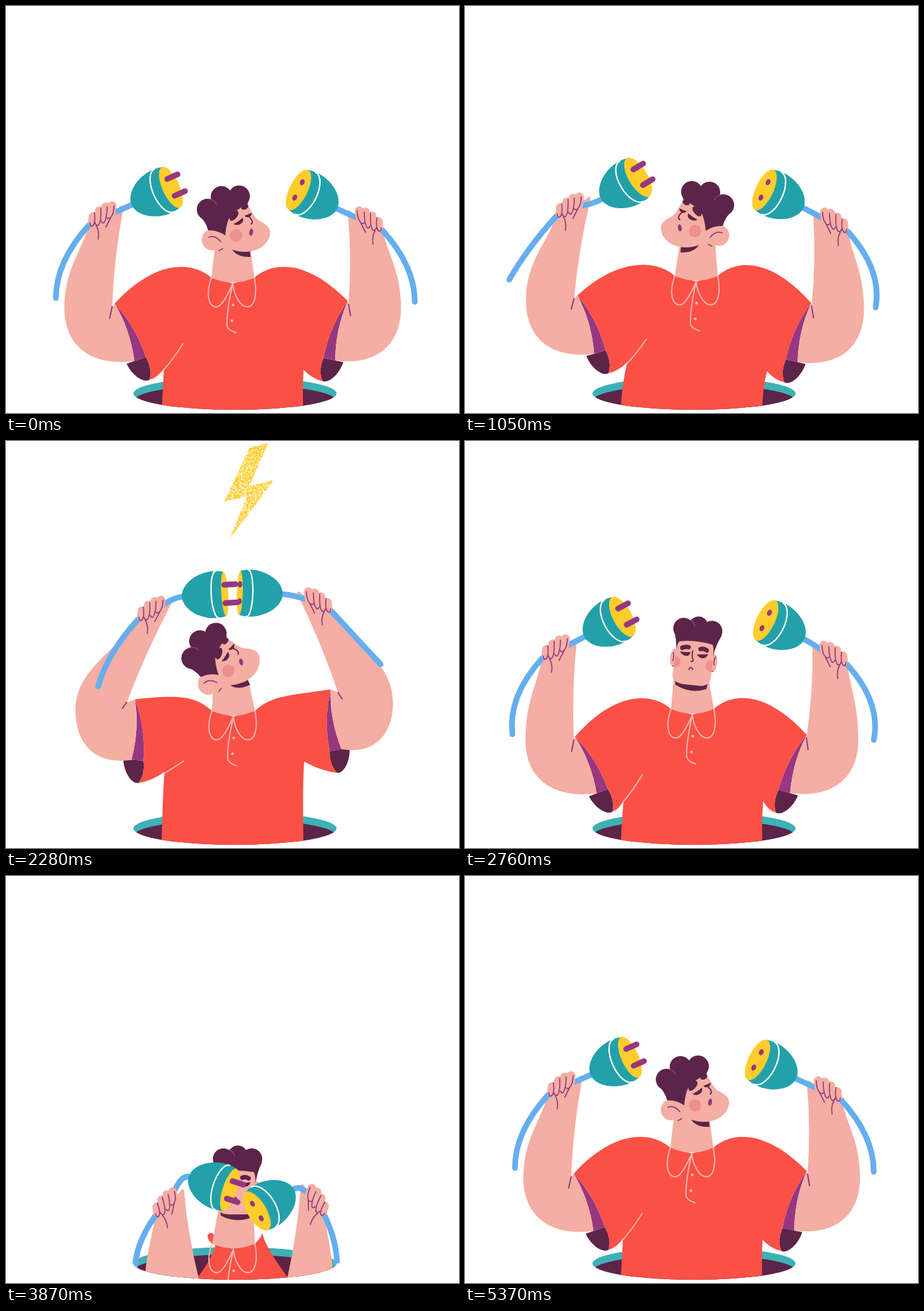
An HTML page with a canvas for the animation above (5400 ms loop, 717 by 644 pixels).

```html
<!DOCTYPE html>
<html lang="en">
<head>
<meta charset="utf-8">
<title>Plugging in</title>
<style>
html, body { margin: 0; width: 100%; height: 100%; overflow: hidden; background: #fff; }
canvas { display: block; }
</style>
</head>
<body>
<canvas id="stage" width="717" height="644"></canvas>
<script>
const W = 717, LOOP = 5400;
const ctx = document.getElementById('stage').getContext('2d');
const SHIRT = '#fb5046', SKIN = '#f4aea3', PURPLE = '#963780', DARK = '#5c2448', TEAL = '#22a1aa',
  YELLOW = '#ffcd2b', BLUE = '#65aeef', BLUSH = '#ee8f8f', SEAM = '#fbb5ac';

const fill = (color, d) => { ctx.fillStyle = color; ctx.fill(new Path2D(d)); };
const line = (color, width, d) => {
  ctx.strokeStyle = color;
  ctx.lineWidth = width;
  ctx.stroke(new Path2D(d));
};
const oval = (color, x, y, rx, ry = rx, deg = 0) => {
  ctx.fillStyle = color;
  ctx.beginPath();
  ctx.ellipse(x, y, rx, ry, rad(deg), 0, 7);
  ctx.fill();
};
const rad = deg => deg * Math.PI / 180;
const clamp = (v, lo, hi) => Math.min(hi, Math.max(lo, v));
const add = (p, x, y) => [p[0] + x, p[1] + y];
const mix = (p, q, k) => [p[0] + (q[0] - p[0]) * k, p[1] + (q[1] - p[1]) * k];
const turn = (p, deg, x, y) => {
  const c = Math.cos(rad(deg)), s = Math.sin(rad(deg));
  return add(p, x * c - y * s, x * s + y * c);
};
const at = (x, y, deg, draw) => {
  ctx.save();
  ctx.translate(x, y);
  ctx.rotate(rad(deg));
  draw();
  ctx.restore();
};
const mirrored = draw => {
  ctx.save();
  ctx.translate(W, 0);
  ctx.scale(-1, 1);
  draw();
  ctx.restore();
};

// Pose: neck x y, head x y tilt facing, then per arm (right one mirrored):
// sleeve x y angle, hand x y, plug x y angle, cord end x y
const idle = [359, 439, 359, 385, 0, 1,
  172, 471, 19, 158, 340, 261, 287, -24, 79, 462,
  176, 467, 12, 148, 348, 254, 291, -26, 70, 468];
const lookLeft = [366, 436, 369, 378, 0, -1,
  178, 458, 16, 171, 326, 274, 271, -31, 70, 433,
  169, 470, 13, 138, 350, 243, 291, -25, 67, 477];
const joined = [360, 436, 356, 386, -24, 1,
  205, 407, -4, 238, 274, 349, 241, -3, 148, 387,
  204, 391, -11, 231, 260, 350, 239, -1, 126, 351];
const front = [360, 433, 358, 384, 6, 0,
  174, 468, 21, 149, 337, 249, 278, -28, 75, 464,
  176, 465, 16, 139, 347, 241, 284, -26, 70, 473];
const stretch = [361, 404, 360, 356, 0, 0,
  201, 434, 18, 184, 309, 274, 234, -45, 90, 396,
  188, 431, 15, 169, 314, 255, 232, -46, 72, 405];
const folded = [360, 497, 365, 441, 0, 1,
  303, 540, -12, 260, 428, 354, 394, 18, 207, 556,
  270, 540, -12, 234, 424, 320, 424, 31, 195, 546];

const vary = (pose, changes) => pose.map((v, i) => v + (changes[i] || 0));
const Y_SLOTS = [1, 3, 7, 10, 12, 15, 17, 20, 22, 25];
const shift = (pose, dy) => pose.map((v, i) => Y_SLOTS.includes(i) ? v + dy : v);
const diving = vary(folded, { 5: -1 });
const raised = vary(front, { 9: 3, 10: -7, 12: -10, 20: -6, 22: -8 });

const keys = [
  [0, idle],
  [350, vary(idle, { 0: 3, 2: 3, 17: -4, 19: -6, 20: -8, 21: -4, 22: -7, 24: -43, 25: -18 })],
  [620, vary(idle, { 0: 2, 2: 2, 24: -4 })],
  [830, vary(lookLeft, { 9: -4, 10: -7, 12: -8, 14: -23, 15: -10 })],
  [1050, lookLeft],
  [1110, vary(lookLeft, { 14: 5 })],
  [1500, joined],
  [1700, joined],
  [1950, vary(joined, { 6: -4, 16: -4, 3: 2, 10: 2, 20: 2 })],
  [2260, joined],
  [2470, vary(front, { 14: -6, 15: -25, 24: -17, 25: -30 })],
  [2760, front],
  [3150, vary(front, { 3: 2, 12: 2, 22: 2 })],
  [3410, raised],
  [3540, stretch],
  [3620, shift(stretch, -9)],
  [3810, diving],
  [3990, shift(diving, 284)],
  [4180, shift(diving, 310)],
  [4560, shift(folded, 310)],
  [4650, folded],
  [4800, vary(idle, { 1: -24, 3: -26, 7: -28, 17: -28, 9: -14, 10: -40, 11: -8, 12: -52, 13: -12,
    14: -72, 15: -105, 19: -14, 20: -40, 21: -8, 22: -54, 23: -12, 24: -60, 25: -105 })],
  [5040, vary(idle, { 1: 3, 3: 4, 14: 4, 24: 5 })],
  [5280, idle],
  [LOOP, idle]
];

// Monotone cubic interpolation: rests at extremes, flows through the rest
function poseAt(t) {
  const n = keys.findIndex(k => k[0] > t) - 1;
  const slope = (j, i) => j < 0 || j > keys.length - 2 ? 0
    : (keys[j + 1][1][i] - keys[j][1][i]) / (keys[j + 1][0] - keys[j][0]);
  const tangent = (a, b) => a * b > 0 ? 2 * a * b / (a + b) : 0;
  const [t0, from] = keys[n], [t1, to] = keys[n + 1];
  const h = t1 - t0, u = (t - t0) / h, v = 1 - u;
  return from.map((a, i) => {
    const s = slope(n, i);
    return a * (1 + 2 * u) * v * v + to[i] * u * u * (3 - 2 * u)
      + h * u * v * (tangent(slope(n - 1, i), s) * v - tangent(s, slope(n + 1, i)) * u);
  });
}

function armFrom([ax, ay, swing, hx, hy, px, py, tilt, ex, ey]) {
  const top = [ax, ay], hand = [hx, hy], fold = Math.max(0, tilt);
  const cuff = (across, along) => turn(top, -swing, across, 96 + along);
  const edge = x => turn(top, -swing, x, 46);
  const wrist = -fold * .8;
  return {
    top, hand, wrist, tilt, cuff, edge,
    plug: [px, py], end: [ex, ey],
    skin: cuff(0, 0), hem: cuff(19, 0), tip: cuff(13, 36),
    elbow: add(top, -92 + .65 * swing + .9 * fold, 16 - .5 * swing),
    thumb: turn(hand, wrist, 28, -22),
    outer: turn(hand, wrist, -27, 7),
    swing
  };
}

function drawSleeve(arm, neck, side) {
  const { top, skin, hem, tip, cuff, edge, swing } = arm;
  fill(DARK, `M${cuff(-13, 0)} C${cuff(-11, 20)} ${cuff(2, 38)} ${tip} Q${cuff(23, 22)} ${hem} L${skin}Z`);
  fill(PURPLE, `M${top} Q${edge(10)} ${skin} L${hem} Q${edge(20)} ${top}Z`);
  const pit = [neck[0] - side, tip[1] - 18];
  const base = 246 - clamp(430 - neck[1], 0, 40) * .5;
  const shoulder = add(neck, -34, -9), dy = top[1] - shoulder[1];
  fill(SHIRT, `M${neck} L${shoulder} C${add(shoulder, -28, -25)} ${add(top, 66, -27 - 1.1 * dy)} ${top}
    Q${edge(20)} ${hem} Q${cuff(23, 22)} ${tip} Q${add(mix(tip, pit, .5), 2, 5)} ${pit}
    Q${base + 2},${pit[1] + 35} ${base},${Math.max(645, pit[1] + 80)} H${neck[0] + 2} Z`);
  return { pit, fold: -20 - swing };
}

function drawShirt(neck, left, right) {
  const { pit, fold } = drawSleeve(left, neck, 109);
  mirrored(() => drawSleeve(right, [W - neck[0], neck[1]], 112));
  line(SEAM, 2, `M${add(pit, 30, fold)} Q${add(pit, 14, fold * .35)} ${add(pit, -1, 3)}`);
}

function drawNeck(neck, hx, hy) {
  fill(SKIN, `M${hx - 27},${hy - 15} L${add(neck, -34, -9)} Q${add(neck, 0, 6)} ${add(neck, 34, -9)} L${hx + 26},${hy - 15}Z`);
  at(...neck, 0, () => {
    line(SEAM, 2, `M-34-9 C-43 16-39 37-26 37 C-17 37-7 16 0 0 C1 16 11 37 23 37 C35 37 39 16 34-9
      M0 0 C-7 31-10 56-9 68 Q-7 74 5 78`);
    oval(SEAM, .5, 34, 2.2);
    oval(SEAM, -1.5, 59, 2.2);
  });
}

function drawArm(arm) {
  const { top, skin, edge, elbow, hand, wrist, thumb, outer, end, plug, tilt } = arm;
  const reach = thumb[0] - top[0] - 14;
  const crease = add(top, -4 - .2 * reach, 5);
  fill(SKIN, `M${thumb} Q${add(mix(thumb, crease, .5), -6, 0)} ${crease} L${top} Q${edge(10)} ${skin}
    C${skin[0] - .65 * (skin[0] - elbow[0])},${skin[1] + 9} ${elbow[0]},${elbow[1] + .68 * (skin[1] - elbow[1])} ${elbow}
    C${elbow[0]},${elbow[1] - .45 * (elbow[1] - outer[1])} ${mix(outer, elbow, .35)} ${outer}
    L${turn(hand, wrist, 5, -14)} L${turn(hand, wrist, 20, -20)} Q${turn(hand, wrist, 26, -27)} ${thumb}Z`);
  if (tilt < 10) line(PURPLE, 2, `M${crease} l${-4 - reach * .06},${18 - Math.max(0, reach) * .2}`);

  const middle = mix(outer, end, .5);
  const sag = clamp(((end[1] - outer[1]) / Math.max(outer[0] - end[0], 15) - 1.1) * .9, -.5, 2);
  const tail = turn(plug, tilt, -66, 0);
  line(BLUE, 9, `M${end} Q${middle[0] + (end[0] - middle[0]) * sag},${middle[1]} ${outer}
    L${turn(hand, wrist, 2, -8)} Q${turn(plug, tilt, -84, 0)} ${tail}`);

  at(...hand, wrist, () => {
    line(SKIN, 14, 'M-20-7 L-21 2 M-10-16 L-11 0 M0-22 L-2-4 M10-24 L8-8');
    line(PURPLE, 1.7, `M-18-13 Q-16 4-21 8 Q-25 9-25 3 M-8-20 Q-7 2-12 7 Q-16 8-17 3
      M2-22 Q2-3-3 3 Q-6 4-7 0 M13-24 Q13-12 8-6 L0 10 M8-6 Q4-2 2-5 M-15 8 Q-10 16-12 29`);
  });
}

function drawPlug({ plug, tilt }, prongs) {
  const open = Math.min(15, 4 + .4 * Math.abs(tilt));
  at(...plug, tilt, () => {
    fill(TEAL, 'M0-35 C-30-44-68-24-68 0 C-68 24-30 44 0 35Z');
    line('#fff', 2.2, `M-12-37 A${open + 4} 37 0 0 0-12 37`);
    oval(YELLOW, 0, 0, open, 35);
    if (prongs) line(PURPLE, 9, 'M0-14.5 H18 M0 14.5 H18');
    else for (const y of [-13.5, 13.5]) oval(PURPLE, 0, y, Math.min(3.6, open), 5);
  });
}

function drawProfile() {
  fill(DARK, 'M-2-1 Q12 5 27 1 L28 12 Q6 13-2-1Z');
  oval(SKIN, -33, -15, 16, 16.5);
  fill(SKIN, 'M22-72 C30-62 33-50 42-45 C56-38 60-32 59-25 C57-8 40 4 20 4 C2 4-12-4-24-9 L-14-60Z');
  oval(DARK, -40, -63, 17);
  oval(DARK, -18, -83, 17);
  oval(DARK, 10, -84, 17);
  fill(DARK, 'M-55-55 Q-43-45-39-30 Q-25-31-12-22 Q-11-36-7-47 Q2-62 24-72 L18-92-30-84Z');
  line(PURPLE, 1.7, 'M-36-79 Q-28-78-26-71 M-38-19 Q-28-23-19-12 M-22 2 L-16-1');
  oval(BLUSH, 5, -22, 9.8);
  oval(DARK, 2, -53, 9.5, 4.8, -50);
  oval(DARK, 19, -67, 6, 3.8, -25);
  fill(DARK, 'M1-40 Q9-44 16-50 Q18-43 12-40 Q7-37 1-40Z M18-53 Q24-55 30-58 Q29-51 25-51 Q21-50 18-53Z');
  line(DARK, 1.8, 'M26-51 Q31-47 31-42 L29-40');
  oval(PURPLE, 29, -27, 3, 5.5, 10);
}

function drawFront(facing) {
  fill(DARK, 'M-26-7 H26 L25 6 Q0 17-25 4Z');
  oval(SKIN, -32, -38, 5.5, 14);
  oval(SKIN, 32, -36, 5.5, 14);
  line(PURPLE, 1.7, 'M-33-46 Q-31-40-33-33 M34-46 Q31-40 33-33 M-32-25 L-29-25 M32-23 L29-23');
  const face = 'M-28-68 L-31-12 Q-31 2-10 2 H12 Q30 2 30-14 V-68Z';
  fill(SKIN, face);
  ctx.save();
  ctx.clip(new Path2D(face));
  oval(BLUSH, -29, -32, 8.5, 9);
  oval(BLUSH, 28, -31, 8.5, 9);
  ctx.restore();
  oval(DARK, -21, -86, 16.5);
  oval(DARK, 2, -92, 15);
  oval(DARK, 24, -86, 16.5);
  fill(DARK, 'M-37-82 Q-30-70-29-48 Q-29-62-25-65 Q0-70 27-65 Q30-62 30-46 Q32-64 40-80 L20-92-20-92Z');
  line(PURPLE, 1.7, 'M-11-100 Q-5-98-4-91');
  at(facing * 22, 0, 0, () => {
    line(DARK, 7, 'M-20-55 Q-15-58-10-57 M9-56 Q14-58 19-55');
    fill(DARK, 'M-23-49 Q-14-48-6-50 Q-7-43-13-43 Q-19-43-23-49Z M4-47 Q12-48 22-49 Q19-41 12-42 Q7-43 4-47Z');
    line(DARK, 1.8, 'M-3-52 Q-4-43-1-38 Q0-35-4-35');
    line(PURPLE, 2.4, 'M-6-22 Q-4-28 0-23');
  });
}

function drawHead(x, y, tilt, facing) {
  at(x, y, tilt, () => {
    if (Math.abs(facing) < .55) return drawFront(facing);
    if (facing < 0) ctx.scale(-1, 1);
    drawProfile();
  });
}

// Grainy lightning bolt
function grains(seed) {
  const random = () => (seed = seed * 16807 % 2147483647) / 2147483647;
  const outline = new Path2D('M385 10 L415 2 384 71 423 61 353 155 381 87 345 95Z');
  const path = new Path2D();
  for (let y = 1; y < 156; y += 1.2)
    for (let x = 344; x < 424; x += 1.2)
      if (random() < .66 && ctx.isPointInPath(outline, x, y)) path.rect(x, y, 1.3, 1.3);
  return path;
}
const bolts = [grains(71), grains(907)];

function drawBolt(t) {
  if (t < 1530 || t > 2320) return;
  const size = clamp((t - 1500) / 120, 0, 1);
  ctx.save();
  ctx.translate(353, 155);
  ctx.scale(size, size);
  ctx.translate(-353, -155);
  ctx.fillStyle = YELLOW;
  ctx.fill(bolts[Math.floor(t / 120) % 2]);
  ctx.restore();
}

const rim = new Path2D('M201.5 613 A161 26 0 0 1 523.5 613 A161 26 0 0 1 201.5 613Z');
const visible = new Path2D('M0 0 H717 V613 H523.5 A161 26 0 0 1 201.5 613 H0Z');

function draw(t) {
  const pose = poseAt(t);
  const [nx, ny, hx, hy, tilt, facing] = pose;
  const left = armFrom(pose.slice(6, 16)), right = armFrom(pose.slice(16));
  ctx.clearRect(0, 0, W, 644);
  ctx.lineCap = ctx.lineJoin = 'round';

  ctx.save();
  ctx.clip(rim);
  ctx.fillStyle = '#3db1b5';
  ctx.fill(rim);
  oval(DARK, 362.5, 625, 161, 26);
  ctx.restore();

  ctx.save();
  ctx.clip(visible);
  drawShirt([nx, ny], left, right);
  drawNeck([nx, ny], hx, hy);
  drawHead(hx, hy, tilt, facing);
  drawArm(left);
  mirrored(() => { drawArm(right); drawPlug(right, false); });
  drawPlug(left, true);
  ctx.restore();
  drawBolt(t);
}

const start = performance.now();
(function frame() {
  draw((performance.now() - start) % LOOP);
  requestAnimationFrame(frame);
})();
</script>
</body>
</html>
```
